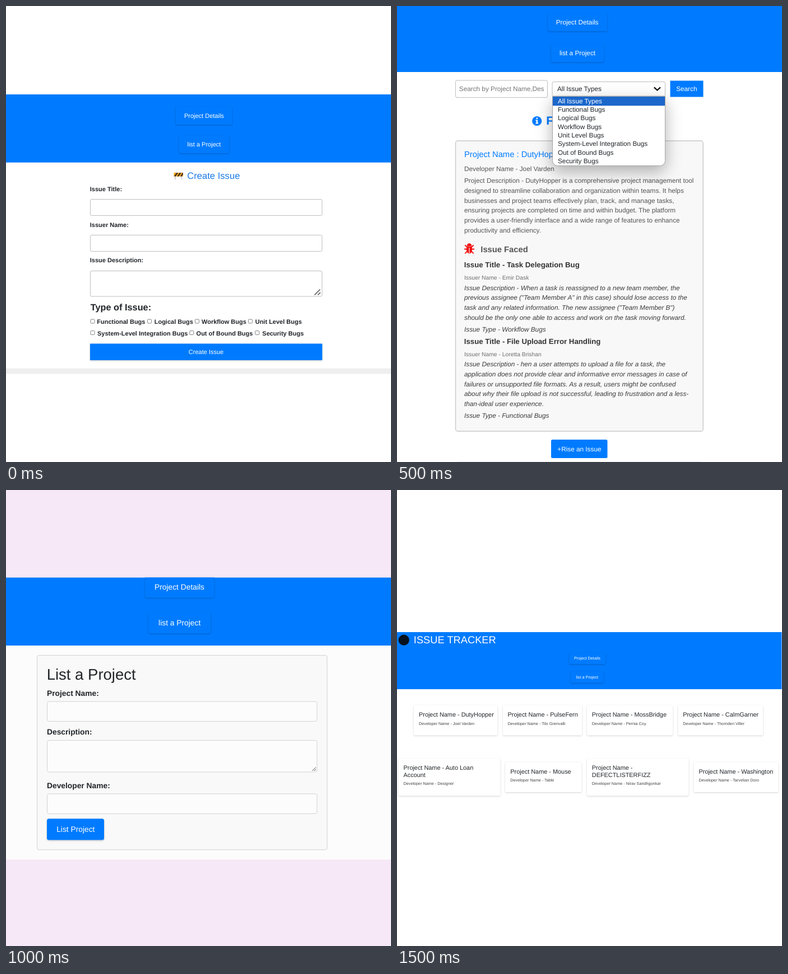
Write an HTML page that moves like this. It is 687 by 815 pixels and loops after 2000 ms.

```html
<!DOCTYPE html>
<html lang="en">
<head>
<meta charset="utf-8">
<title>Issue tracker screens</title>
<style>
  html, body { margin: 0; width: 100%; height: 100%; overflow: hidden; background: #fff; }
  svg { display: block; width: 687px; height: 815px; font-family: "Liberation Sans", Arial, sans-serif; }
  text { white-space: pre; text-rendering: geometricPrecision; fill: #212529; }

  .scene { animation: show 2s step-end infinite; visibility: hidden; }
  #list { animation-delay: -1.5s; }
  #add { animation-delay: -1s; }
  #home { animation-delay: -.5s; }
  @keyframes show {
    0% { visibility: visible; }
    25%, 100% { visibility: hidden; }
  }

  .blue { fill: #007bff; }
  .btn { fill: #007bff; filter: drop-shadow(0 1.5px 1.5px rgba(0, 0, 0, .24)); }
  .field { fill: #fff; stroke: #bdbdbd; }
  .card { fill: #f8f8f8; stroke: #c9c9c9; }
  .tile { fill: #fff; filter: drop-shadow(0 1px 1.5px rgba(0, 0, 0, .17)); }
  .line { fill: none; stroke: #444; }
  .mid text, text.mid { text-anchor: middle; fill: #fff; }
  .b { font-weight: bold; }
  .i { font-style: italic; }
  .box rect { fill: #fff; stroke: #777; stroke-width: .9; }

  #create { font-size: 11px; }
  #list { font-size: 11.77px; }
  #list .p { fill: #555; }
  #list .i { fill: #3c3c3c; }
  #list .who { font-size: 10.34px; fill: #707070; }
  #list .h { font-size: 13.22px; font-weight: bold; fill: #333; }
  #add { font-size: 13.8px; }
  #home { font-size: 7.25px; }
  #home .t { font-size: 10.9px; }
  #home .d { fill: #444; }
  .menu { filter: drop-shadow(0 10px 14px rgba(0, 0, 0, .3)); }
</style>
</head>
<body>
<svg viewBox="0 0 687 815">

  <g id="create" class="scene">
    <rect width="687" height="815" fill="#fff"/>
    <rect class="blue" y="158" width="687" height="121.7"/>
    <rect class="btn" x="303" y="180" width="100" height="32" rx="3"/>
    <rect class="btn" x="309" y="232" width="89" height="31" rx="3"/>
    <g class="mid">
      <text x="353.4" y="199.5">Project Details</text>
      <text x="353.4" y="251.3">list a Project</text>
    </g>

    <!-- road barrier -->
    <path d="M302 297v13M313.5 297v13" stroke="#c9c9c9" stroke-width="1.6"/>
    <rect x="299.5" y="298" width="16.5" height="6.5" rx="1" fill="#f5a623"/>
    <path d="M299.8 304.5l4.5-6.5h2.8l-4.5 6.5zM305.3 304.5l4.5-6.5h2.8l-4.5 6.5zM310.8 304.5l4.5-6.5h.7v3l-2.4 3.5z" fill="#3a2a1c"/>
    <text x="323.3" y="308.7" font-size="16.6" style="fill:#1a7ae6">Create Issue</text>

    <g class="b">
      <text x="149.8" y="331">Issue Title:</text>
      <text x="149.8" y="395">Issuer Name:</text>
      <text x="149.8" y="458">Issue Description:</text>
      <text x="150.8" y="544" font-size="16.3">Type of Issue:</text>
      <text x="162.3" y="568">Functional Bugs</text>
      <text x="264.7" y="568">Logical Bugs</text>
      <text x="349" y="568">Workflow Bugs</text>
      <text x="444.7" y="568">Unit Level Bugs</text>
      <text x="163" y="589.3">System-Level Integration Bugs</text>
      <text x="339.6" y="589.3">Out of Bound Bugs</text>
      <text x="457.3" y="589.3">Security Bugs</text>
    </g>
    <rect class="field" x="150.5" y="345.5" width="413.5" height="29" rx="2.5"/>
    <rect class="field" x="150.5" y="409.5" width="413.5" height="29" rx="2.5"/>
    <rect class="field" x="150.5" y="473.5" width="413.5" height="45.5" rx="2.5"/>
    <path class="line" d="M550.5 516.5l10-10M556.5 516.5l4.5-4.5" stroke-width="1.4"/>
    <g class="box">
      <rect x="151" y="560" width="7" height="7" rx="1.3"/>
      <rect x="252.5" y="560" width="7" height="7" rx="1.3"/>
      <rect x="337.5" y="560" width="7" height="7" rx="1.3"/>
      <rect x="432.5" y="560" width="7" height="7" rx="1.3"/>
      <rect x="151" y="580.5" width="7" height="7" rx="1.3"/>
      <rect x="327.8" y="580.5" width="7" height="7" rx="1.3"/>
      <rect x="444.8" y="580.5" width="7" height="7" rx="1.3"/>
    </g>
    <rect class="btn" x="150" y="603.5" width="414.3" height="29.5"/>
    <text class="mid" x="357" y="622.3">Create Issue</text>
    <rect y="647.5" width="687" height="10" fill="#efefef"/>
  </g>

  <g id="list" class="scene">
    <rect width="687" height="815" fill="#fff"/>
    <rect class="blue" width="687" height="118"/>
    <rect class="btn" x="269" y="13" width="106" height="32" rx="3"/>
    <rect class="btn" x="275" y="68" width="94" height="32" rx="3"/>
    <g class="mid">
      <text x="321.6" y="33.2">Project Details</text>
      <text x="322" y="87.6">list a Project</text>
    </g>

    <rect class="field" x="104.5" y="133" width="164" height="30.5" rx="2.5"/>
    <text x="110.8" y="152.2" style="fill:#757575">Search by Project Name,Des</text>
    <rect class="field" x="277" y="135.5" width="201.5" height="25.5" rx="2.5"/>
    <text x="286" y="152.2">All Issue Types</text>
    <path class="line" d="M458.8 145.3l5.6 5.2 5.6-5.2" stroke-width="2.3" style="stroke:#111"/>
    <rect class="blue" x="487.5" y="133.5" width="59" height="29"/>
    <text class="mid" x="516.8" y="152.2">Search</text>

    <circle class="blue" cx="249.7" cy="205.5" r="8.6"/>
    <path d="M248.6 199.6h2.4v2.4h-2.4zM247.3 203.6h3.7v5.2h1.2v1.7h-4.9v-1.7h1.3v-3.5h-1.3z" fill="#fff"/>
    <text class="b" x="266.2" y="212.3" font-size="21" style="fill:#007bff">F</text>

    <rect class="card" x="104.5" y="241" width="441.7" height="519" rx="4" stroke-width="1.4"/>
    <text x="120" y="269.7" font-size="14.75" style="fill:#007bff">Project Name : DutyHopper</text>
    <g class="p">
      <text class="p" x="120" y="295.2">Developer Name - Joel Varden</text>
      <text class="p" y="316.3"><tspan x="120">Project Description - DutyHopper is a comprehensive project management tool</tspan><tspan x="120" dy="17.7">designed to streamline collaboration and organization within teams. It helps</tspan><tspan x="120" dy="17.7">businesses and project teams effectively plan, track, and manage tasks,</tspan><tspan x="120" dy="17.7">ensuring projects are completed on time and within budget. The platform</tspan><tspan x="120" dy="17.7">provides a user-friendly interface and a wide range of features to enhance</tspan><tspan x="120" dy="17.7">productivity and efficiency.</tspan></text>
    </g>

    <!-- bug -->
    <g stroke="#f30d0d" stroke-width="1.9" fill="none">
      <path d="M120 434.5h18M121.3 427.5l4 3.5M136.7 427.5l-4 3.5M121.3 442.3l4-4M136.7 442.3l-4-4"/>
      <path d="M124.7 430h8.6v7a4.3 5 0 0 1-8.6 0zM125.2 428.5a3.8 3.8 0 0 1 7.6 0z" fill="#f30d0d" stroke-width="1"/>
      <path d="M129 432v10" stroke="#f8f8f8" stroke-width="1.2"/>
    </g>
    <text class="b" x="149.3" y="440" font-size="14.75" style="fill:#555">Issue Faced</text>

    <text class="h" x="119.8" y="467.2">Issue Title - Task Delegation Bug</text>
    <text class="who" x="120" y="489.2">Issuer Name - Emir Dask</text>
    <text class="i" y="507.5"><tspan x="120">Issue Description - When a task is reassigned to a new team member, the</tspan><tspan x="120" dy="17.7">previous assignee ("Team Member A" in this case) should lose access to the</tspan><tspan x="120" dy="17.7">task and any related information. The new assignee ("Team Member B")</tspan><tspan x="120" dy="17.7">should be the only one able to access and work on the task moving forward.</tspan></text>
    <text class="i" x="120" y="581.5">Issue Type - Workflow Bugs</text>

    <text class="h" x="119.8" y="604.2">Issue Title - File Upload Error Handling</text>
    <text class="who" x="120" y="626.2">Issuer Name - Loretta Brishan</text>
    <text class="i" y="644.3"><tspan x="120">Issue Description - hen a user attempts to upload a file for a task, the</tspan><tspan x="120" dy="17.7">application does not provide clear and informative error messages in case of</tspan><tspan x="120" dy="17.7">failures or unsupported file formats. As a result, users might be confused</tspan><tspan x="120" dy="17.7">about why their file upload is not successful, leading to frustration and a less-</tspan><tspan x="120" dy="17.7">than-ideal user experience.</tspan></text>
    <text class="i" x="120" y="736.3">Issue Type - Functional Bugs</text>

    <rect class="blue" x="275" y="775" width="100.5" height="33" rx="2.5"/>
    <text class="mid" x="325.4" y="796.2">+Rise an Issue</text>
    <rect x="108" y="814" width="435" height="1" fill="#eee"/>

    <path class="menu" d="M277.5 161.5h201v115a9 9 0 0 1-9 9h-183a9 9 0 0 1-9-9z" fill="#fff" stroke="#a5a5a5"/>
    <rect x="278" y="162" width="200" height="16.2" fill="#1b67ca"/>
    <text x="287" y="173.6" style="fill:#fff">All Issue Types</text>
    <text y="188.9"><tspan x="287">Functional Bugs</tspan><tspan x="287" dy="15.33">Logical Bugs</tspan><tspan x="287" dy="15.33">Workflow Bugs</tspan><tspan x="287" dy="15.33">Unit Level Bugs</tspan><tspan x="287" dy="15.33">System-Level Integration Bugs</tspan><tspan x="287" dy="15.33">Out of Bound Bugs</tspan><tspan x="287" dy="15.33">Security Bugs</tspan></text>
  </g>

  <g id="add" class="scene">
    <rect width="687" height="815" fill="#f6e8f6"/>
    <rect y="278" width="687" height="382.5" fill="#fcfcfc"/>
    <rect class="blue" y="156.5" width="687" height="121.5"/>
    <path class="btn" d="M248 156.5h123.5v32a4 4 0 0 1-4 4h-115.500a4 4 0 0 1-4-4z"/>
    <rect class="btn" x="254.500" y="218" width="110.500" height="38.300" rx="4"/>
    <g class="mid">
      <text x="309.5" y="178.200">Project Details</text>
      <text x="309.700" y="242.200">list a Project</text>
    </g>
    <rect class="card" x="55.5" y="295.500" width="517.500" height="347.500" rx="3.5" style="fill:#f9f9f9;stroke:#d2d2d2"/>
    <text x="72.700" y="339.300" font-size="27.500">List a Project</text>
    <g class="b">
      <text x="73" y="368.200">Project Name:</text>
      <text x="73" y="437.200">Description:</text>
      <text x="73" y="533">Developer Name:</text>
    </g>
    <g style="--c:#fcfcfc">
      <rect class="field" x="73.500" y="378" width="481.500" height="35.500" rx="3.500" style="fill:var(--c);stroke:#d2d2d2"/>
      <rect class="field" x="73.500" y="447.500" width="481.500" height="56.500" rx="3.500" style="fill:var(--c);stroke:#d2d2d2"/>
      <rect class="field" x="73.500" y="543" width="481.500" height="35.500" rx="3.500" style="fill:var(--c);stroke:#d2d2d2"/>
    </g>
    <path class="line" d="M546.500 502l6.500-6.500M550 502l3-3" stroke-width="1"/>
    <rect class="btn" x="73" y="587.500" width="102" height="38" rx="3.500"/>
    <text class="mid" x="124.300" y="611.200">List Project</text>
  </g>

  <g id="home" class="scene">
    <rect width="687" height="815" fill="#fff"/>
    <rect class="blue" y="254" width="686.5" height="102"/>
    <circle cx="12.200" cy="268.200" r="9.600" fill="#06121f"/>
    <text x="29.800" y="274.300" font-size="18.300" style="fill:#fff">ISSUE TRACKER</text>
    <rect class="btn" x="307" y="291" width="65" height="20" rx="2"/>
    <rect class="btn" x="310" y="325" width="58.500" height="19.500" rx="2"/>
    <g class="mid">
      <text x="339.400" y="303.400">Project Details</text>
      <text x="339.400" y="337.300">list a Project</text>
    </g>

    <rect class="tile" x="30" y="385" width="149.500" height="53.500" rx="2"/>
    <rect class="tile" x="189" y="385" width="141" height="53.500" rx="2"/>
    <rect class="tile" x="339" y="385" width="153" height="53.500" rx="2"/>
    <rect class="tile" x="501.500" y="385" width="151.500" height="53.500" rx="2"/>
    <rect class="tile" x="2.500" y="480" width="182" height="66.500" rx="2"/>
    <rect class="tile" x="193" y="486.500" width="136.500" height="53.500" rx="2"/>
    <rect class="tile" x="339" y="480" width="181.500" height="66.500" rx="2"/>
    <rect class="tile" x="529.500" y="486.500" width="151" height="53.500" rx="2"/>

    <g class="t">
      <text x="39" y="405">Project Name - DutyHopper</text>
      <text x="197.500" y="405">Project Name - PulseFern</text>
      <text x="347.800" y="405">Project Name - MossBridge</text>
      <text x="510.200" y="405">Project Name - CalmGarner</text>
      <text y="500"><tspan x="11.500">Project Name - Auto Loan</tspan><tspan x="11.500" dy="13.100">Account</tspan></text>
      <text x="202.300" y="506.700">Project Name - Mouse</text>
      <text y="500"><tspan x="347.800">Project Name -</tspan><tspan x="347.800" dy="13.100">DEFECTLISTERFIZZ</tspan></text>
      <text x="538.500" y="506.700">Project Name - Washington</text>
    </g>
    <text class="d" x="39" y="419.500">Developer Name - Joel Varden</text>
    <text class="d" x="197.500" y="419.500">Developer Name - Tilo Grenvalli</text>
    <text class="d" x="347.800" y="419.500">Developer Name - Pernia Coy</text>
    <text class="d" x="510.200" y="419.500">Developer Name - Thornden Viller</text>
    <text class="d" x="11.500" y="527.300">Developer Name - Designer</text>
    <text class="d" x="202.300" y="521">Developer Name - Table</text>
    <text class="d" x="347.800" y="527.300">Developer Name - Nirav Sandhgonkar</text>
    <text class="d" x="538.500" y="521">Developer Name - Tarvelian Doro</text>
  </g>
</svg>
</body>
</html>
```
